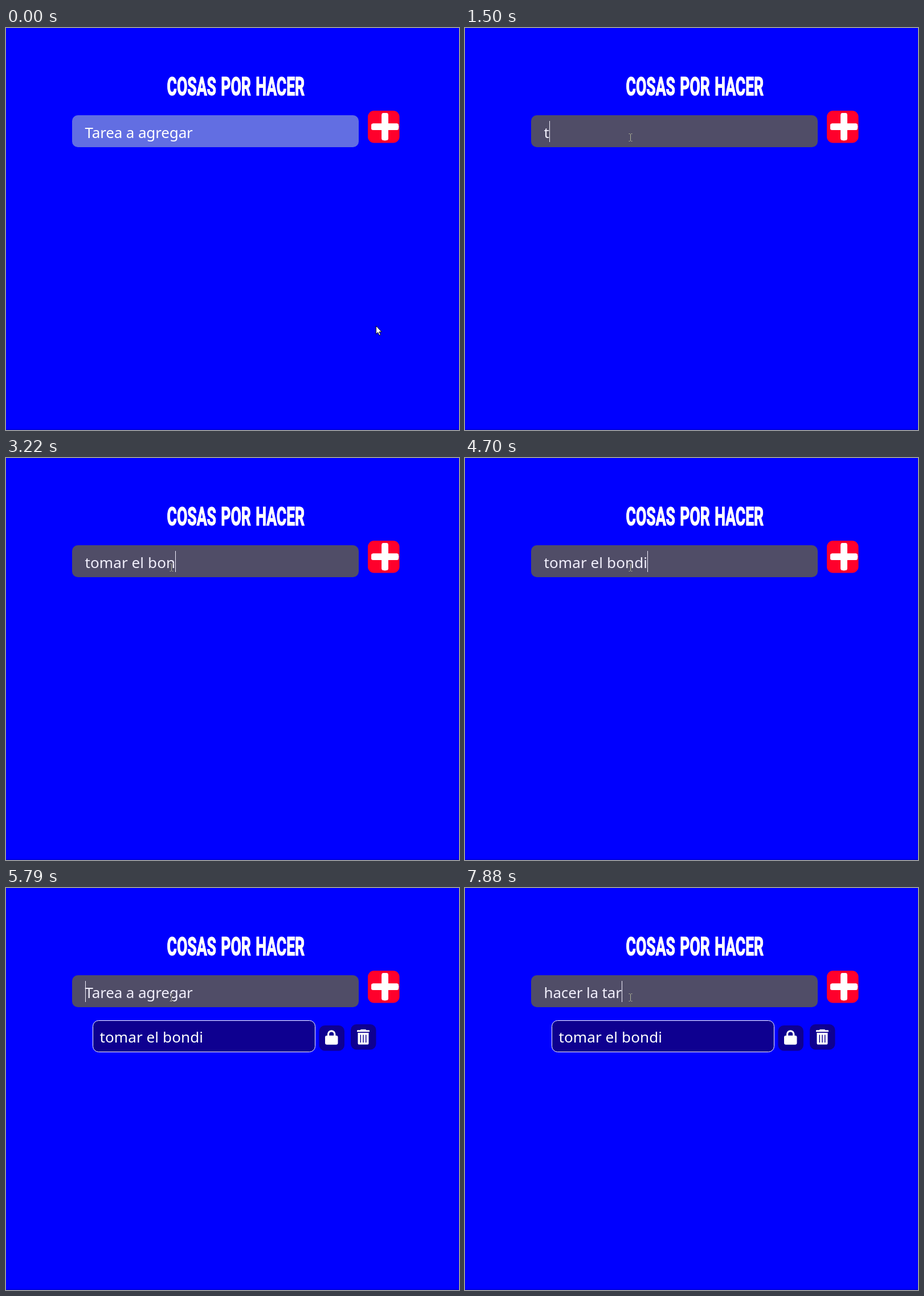
Recreate the animation shown at these times as an HTML page. Size 795x705 px, loop 8 s.

```html
<!DOCTYPE html>
<html lang="es">
<head>
<meta charset="utf-8">
<title>Cosas por hacer</title>
<style>
  html, body { margin: 0; width: 100%; height: 100%; overflow: hidden; background: #00f; }
  svg { display: block; width: 795px; height: 705px; isolation: isolate; }
  text { font: 26px "Noto Sans", "Open Sans", sans-serif; fill: #fff; white-space: pre; }
  .title {
    font: 700 44px Roboto, "Liberation Sans", sans-serif;
    word-spacing: 3px; text-anchor: middle;
    stroke: #fff; stroke-width: 1.5px;
  }
  .panel { fill: #0e0090; }
  .ibeam { fill: none; stroke: #fff; mix-blend-mode: difference; }
</style>
</head>
<body>
<svg viewBox="0 0 795 705">
  <rect width="795" height="705" fill="#00f"/>
  <rect y="703" width="795" height="2" fill="#0000e0"/>
  <text class="title" transform="translate(403.3 117.5) scale(.604 1)">COSAS POR HACER</text>

  <rect id="field" x="116" y="153" width="503" height="56" rx="10"/>
  <text id="entry" x="138.5" y="193" xml:space="preserve"></text>
  <rect id="caret" y="163" width="1" height="37" fill="#f0eefb"/>

  <rect x="635" y="145" width="55.5" height="56.5" rx="11" fill="#ff002c"/>
  <path d="M644 173.2h42.5M665 152v42.5" stroke="#fff" stroke-width="11.5"/>
  <path d="M644 173.2h42.5M665 152v42.5" stroke="#fff" stroke-width="6" stroke-linecap="round"/>
  <g fill="#fff">
    <rect x="641" y="167.5" width="48" height="11.5" rx="3"/>
    <rect x="659.3" y="149" width="11.5" height="48" rx="3"/>
  </g>

  <g id="task">
    <rect class="panel" x="152.5" y="232.5" width="390" height="55" rx="10" stroke="#fff"/>
    <text x="164.5" y="271" letter-spacing=".1">tomar el bondi</text>
    <rect class="panel" x="549.5" y="241" width="44.5" height="44.5" rx="10"/>
    <rect class="panel" x="605" y="239" width="44.5" height="44.5" rx="10"/>
    <g fill="#fff">
      <rect x="560" y="258.7" width="22.5" height="16" rx="3.2"/>
      <path d="M565.6 260v-3.6a5.6 5.6 0 0 1 11.2 0v3.6" fill="none" stroke="#fff" stroke-width="3.2"/>
      <path d="M616 250.2q0-1 1-1h4.8l.9-1.2h8.6l.9 1.2h4.8q1 0 1 1v2.1h-22z"/>
      <path d="M617.5 254h19v18q0 2.6-2.6 2.6h-13.8q-2.6 0-2.6-2.6z"/>
    </g>
    <path d="M622.3 258v12.5M627 258v12.5M631.7 258v12.5" stroke="#0e0090" stroke-width="1.5" stroke-linecap="round"/>
  </g>

  <path id="arrow" d="M.5 .5v14.2l3.2-3 2.3 5.2 2.3-1-2.3-5h4.3z" fill="#fff" stroke="#000" stroke-width=".9"/>
  <path id="ibeam" class="ibeam" d="M-2.5-6.5h2M1.5-6.5h2M.5-6v12M-2.5 6.5h2M1.5 6.5h2"/>
</svg>
<script>
const LOOP = 8000, HOVER = 120, CLICK = 570, SUBMIT = 4780;
const START_X = 138.5, BLINK = 1005, CARET_ON = 530;
const el = Object.fromEntries(['field', 'entry', 'caret', 'task', 'arrow', 'ibeam']
  .map(id => [id, document.getElementById(id)]));

// Keys are spread evenly from the first to the last of a burst
const burst = (text, from, to) => [...text].map((char, i) =>
  ({ char, time: from + (to - from) * i / (text.length - 1) }));

const firstTask = [
  ...burst('tomar el ', 1500, 2540), ...burst('bon', 2990, 3220), ...burst('di', 3540, 3690)
];
const secondTask = [...burst('hacer la ', 6320, 7350), ...burst('tar', 7500, 7880)];

const show = (node, on) => node.setAttribute('visibility', on ? 'visible' : 'hidden');

function drawEntry(t) {
  const submitted = t >= SUBMIT;
  const keys = (submitted ? secondTask : firstTask).filter(key => key.time <= t);
  const typed = keys.map(key => key.char).join('');
  el.entry.textContent = typed || 'Tarea a agregar';
  el.entry.style.letterSpacing = typed && !submitted ? '.1px' : '-.14px';

  // The caret restarts its blink at every action
  const lastAction = keys.length ? keys.at(-1).time : submitted ? SUBMIT : CLICK;
  const width = typed ? el.entry.getComputedTextLength() : 0;
  el.caret.setAttribute('x', Math.round(START_X + width));
  show(el.caret, t >= lastAction && (t - lastAction) % BLINK < CARET_ON);
  show(el.task, submitted);
}

function drawPointer(t, hover) {
  const step = Math.floor(t / 60) * 60;
  const rest = Math.max(0, 1 - step / 190);
  const x = Math.round(290 + 359 * rest ** 3);
  const y = Math.round(192 + 330 * rest ** 4);
  for (const node of [el.arrow, el.ibeam]) node.setAttribute('transform', `translate(${x} ${y})`);
  show(el.arrow, !hover);
  show(el.ibeam, hover);
}

function draw(t) {
  const hover = t >= HOVER;
  el.field.setAttribute('fill', hover ? '#504d67' : '#626ee2');
  el.entry.style.fill = hover ? '#f0eefb' : '#fff';
  drawEntry(t);
  drawPointer(t, hover);
}

const start = performance.now();
function tick() {
  draw((performance.now() - start) % LOOP);
  requestAnimationFrame(tick);
}
tick();
</script>
</body>
</html>
```
